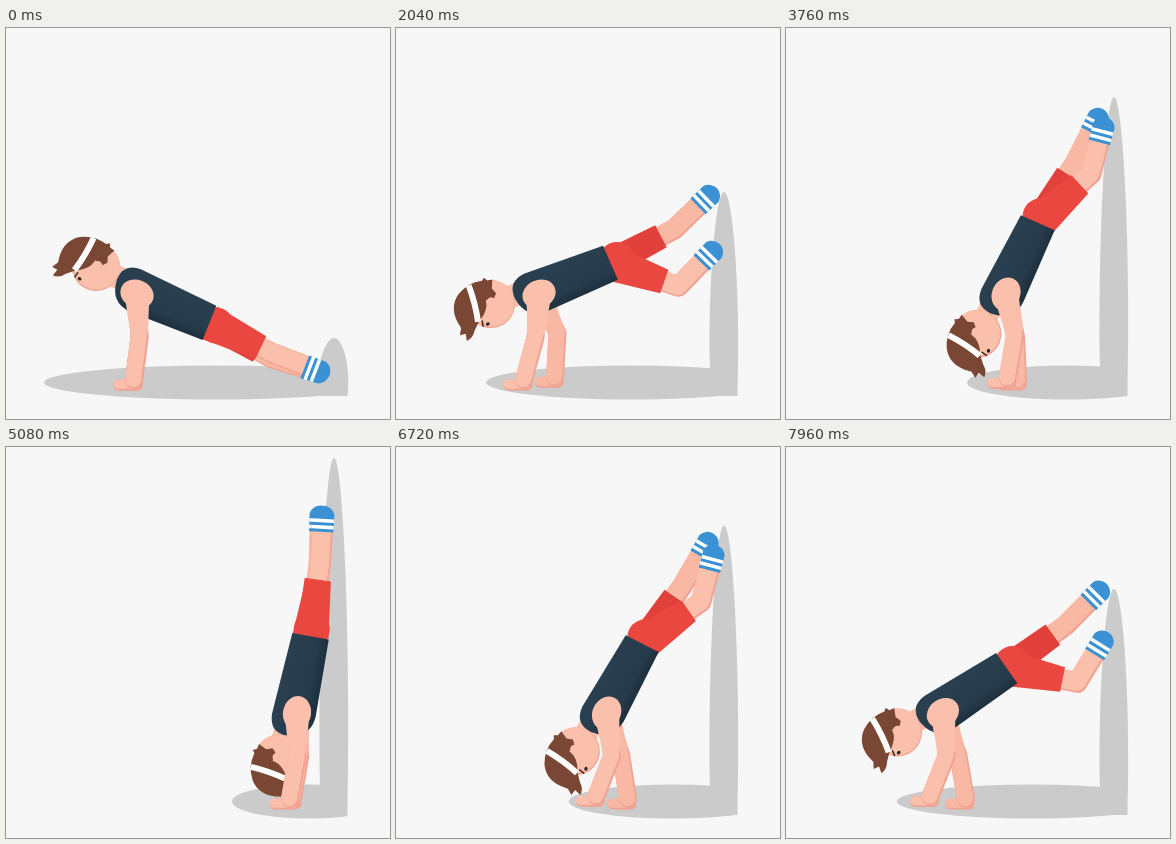
An HTML page with a canvas for the animation above (8000 ms loop, 384x391 px).

```html
<!DOCTYPE html>
<html lang="en">
<head>
<meta charset="utf-8">
<title>Wall walk</title>
<style>
html, body { margin: 0; width: 100%; height: 100%; overflow: hidden; background: #f7f7f7; }
canvas { display: block; width: 384px; height: 391px; }
</style>
</head>
<body>
<canvas id="stage" width="384" height="391"></canvas>
<script>
const ctx = document.getElementById('stage').getContext('2d');
const LOOP = 8000, PEAK = 5080, DESCENT = 0.92;
const SKIN = '#fbc0ab', SKIN_EDGE = '#f0a392', SKIN_FAR = '#f8b8a4';
const RED = '#e9473f', RED_FAR = '#e2413b', BLUE = '#3a91d3', HAIR = '#7a4735', SHADE = '#cbcbcb';
const SHOULDER_Y = 266, WRIST_Y = 352, FOOT_X = 317;
const TORSO = 78, THIGH = 72, SHIN = 51, STRIDE = 52;

// Key poses of the climb; the way down plays them in reverse.
const poses = [
  { at: 0, x: 131, tilt: 21.7, near: 345, far: 345, left: 38, top: 310 },
  { at: 1320, x: 126, tilt: 4, near: 270, far: 231, left: 56, top: 204 },
  { at: 2040, x: 143, tilt: -23.6, near: 222, far: 166, left: 90, top: 164 },
  { at: 3760, x: 220, tilt: -66, near: 97, far: 85, left: 181, top: 69 },
  { at: PEAK, x: 291, tilt: -80, near: 62, far: 62, left: 226, top: 11 }
];

const ease = u => u * u * (3 - 2 * u);
const clamp = u => Math.max(0, Math.min(1, u));

// Smooth interpolation without overshoot, coming to rest at the peak.
function poseAt(time) {
  const t = time < PEAK ? time : PEAK - (time - PEAK) * DESCENT;
  let i = 0;
  while (i < poses.length - 2 && t >= poses[i + 1].at) i++;
  const a = poses[i], b = poses[i + 1], span = b.at - a.at;
  const u = (t - a.at) / span, w = 1 - u;
  const rate = (k, key) => (poses[k + 1][key] - poses[k][key]) / (poses[k + 1].at - poses[k].at);
  const slope = (k, key) => {
    if (k === 0) return rate(0, key);
    if (k === poses.length - 1) return 0;
    const p = rate(k - 1, key), q = rate(k, key);
    return p * q <= 0 ? 0 : 2 * p * q / (p + q);
  };
  const pose = {};
  for (const key in a) {
    pose[key] = a[key] + (b[key] - a[key]) * ease(u)
      + span * (slope(i, key) * u * w * w - slope(i + 1, key) * u * u * w);
  }
  return pose;
}

// A hand stays planted, then swings one stride while the shoulder passes over it.
function handAt(x, from, to) {
  const steps = (x - 128) / STRIDE, planted = Math.max(0, Math.floor(steps));
  const swing = ease(clamp((steps - planted - from) / (to - from)));
  const lift = Math.sin(Math.PI * swing);
  return { wrist: [128 + (planted + swing) * STRIDE, WRIST_Y - 3 * lift], bend: 4 + 7 * lift };
}

const along = ([x, y], angle, d) => [x + d * Math.cos(angle), y + d * Math.sin(angle)];
const angleOf = (a, b) => Math.atan2(b[1] - a[1], b[0] - a[0]);

function bendPoint(a, b, share, bend) {
  const middle = [a[0] + (b[0] - a[0]) * share, a[1] + (b[1] - a[1]) * share];
  return along(middle, angleOf(a, b) + Math.PI / 2, bend);
}

function oval([x, y], rx, ry, color) {
  ctx.fillStyle = color;
  ctx.beginPath();
  ctx.ellipse(x, y, rx, ry, 0, 0, 2 * Math.PI);
  ctx.fill();
}

function line(points, width, color) {
  ctx.strokeStyle = color;
  ctx.lineWidth = width;
  ctx.lineCap = ctx.lineJoin = 'round';
  ctx.beginPath();
  points.forEach(p => ctx.lineTo(...p));
  ctx.stroke();
}

function limb(points, width, color) {
  line(points, width, SKIN_EDGE);
  line(points.map(([x, y]) => [x - 0.8, y - 0.8]), width - 2, color);
}

function placed([x, y], angle, draw) {
  ctx.save();
  ctx.translate(x, y);
  ctx.rotate(angle);
  draw();
  ctx.restore();
}

function shape(d, color) {
  ctx.fillStyle = color;
  ctx.fill(new Path2D(d));
}

function taper(a, angle, length, w0, w1, color) {
  placed(a, angle, () => shape(`M0 ${-w0 / 2}L${length} ${-w1 / 2}V${w1 / 2}L0 ${w0 / 2}Z`, color));
}

function drawShade(left, top) {
  const middle = (368 + top) / 2, right = 380;
  ctx.save();
  ctx.beginPath();
  ctx.rect(0, 0, 341, 391);
  ctx.clip();
  oval([(left + right) / 2, 354.5], (right - left) / 2, 17, SHADE);
  ctx.restore();
  shape(`M314 368V${Math.max(338, top + 20)}C312 ${middle} 319 ${top} 328 ${top}` +
    `C337 ${top} 345 ${middle} 341.5 368Z`, SHADE);
}

function drawArm(shoulder, tilt, { wrist, bend }, color) {
  const elbow = bendPoint(shoulder, wrist, 0.5, -bend);
  const [x, y] = wrist;
  limb([[x - 15, y + 5], [x + 3, y + 5]], 11, color);
  limb([shoulder, elbow, wrist], 18, color);
  taper(shoulder, angleOf(shoulder, elbow), 40, 25, 17, color);
  placed(shoulder, tilt, () => oval([0, 0], 17, 14, color));
}

function drawLeg(hip, target, skin, red, waist) {
  const dir = angleOf(hip, target);
  const dist = Math.min(THIGH + SHIN - 0.1, Math.hypot(target[0] - hip[0], target[1] - hip[1]));
  const foot = along(hip, dir, dist);
  const reach = (dist * dist + THIGH * THIGH - SHIN * SHIN) / (2 * dist);
  const knee = bendPoint(hip, foot, reach / dist, Math.sqrt(Math.max(0, THIGH * THIGH - reach * reach)));
  const thighAngle = angleOf(hip, knee), shinAngle = angleOf(knee, foot);
  limb([along(hip, thighAngle, 45), knee, along(foot, shinAngle, -14)], 20.5, skin);
  placed(foot, shinAngle, () => {
    shape('M-18-11H0A11.5 11.5 0 0 1 0 11H-18Z', BLUE);
    shape('M-15-11h3.5v22h-3.5zM-8.5-11h3.5v22h-3.5z', '#fff');
  });
  taper(hip, thighAngle, 57, waist, 25, red);
}

function drawHead() {
  line([[10, 1], [39, 3]], 23, SKIN);
  oval([5, 1], 24, 24, SKIN_EDGE);
  oval([5.3, 0.3], 23.3, 23.3, SKIN);
  shape('M11-22L9-26L6-24Q-8-28-21-21Q-34-13-33 4L-32 11L-36 17L-30 18L-32 25Q-25 25-21 19' +
    'L-13 12Q-4 8 0 1L2-5Q8 0 12-5L14-7L12-13L16-21Z', HAIR);
  oval([6, -1], 4.5, 4.5, SKIN);
  ctx.strokeStyle = '#fff';
  ctx.lineWidth = 6;
  ctx.lineCap = 'butt';
  ctx.stroke(new Path2D('M-8-25Q-9-6-14 12'));
  line([[-11, 18], [-10, 13]], 1.6, '#4a2b24');
  oval([-6, 18], 2, 1.6, '#2b2526');
}

function drawTorso() {
  const tone = ctx.createLinearGradient(0, -25, 0, 20);
  tone.addColorStop(0, '#2a4050');
  tone.addColorStop(0.75, '#263b4b');
  tone.addColorStop(1, '#1b2e3b');
  shape(`M${TORSO}-18.5L-5-24.5Q-24-24-24-6Q-22 18 0 19L${TORSO} 18.5Z`, tone);
}

function draw(t) {
  const pose = poseAt(t);
  const shoulder = [pose.x, SHOULDER_Y], tilt = pose.tilt * Math.PI / 180;
  const hip = along(shoulder, tilt, TORSO);

  ctx.fillStyle = '#f7f7f7';
  ctx.fillRect(0, 0, 384, 391);
  drawShade(pose.left, pose.top);
  drawArm(shoulder, tilt, handAt(pose.x, 0.08, 0.45), SKIN_FAR);
  drawLeg(hip, [FOOT_X - 2, pose.far], SKIN_FAR, RED_FAR, 28);
  oval(along(hip, tilt, 7), 18, 18, RED);
  drawLeg(hip, [FOOT_X + 1, pose.near], SKIN, RED, 36);
  placed(shoulder, tilt, () => {
    placed([-53, -11], 0, drawHead);
    drawTorso();
  });
  drawArm(shoulder, tilt, handAt(pose.x, 0.32, 0.95), SKIN);
}

const start = performance.now();
function tick() {
  draw((performance.now() - start) % LOOP);
  requestAnimationFrame(tick);
}
tick();
</script>
</body>
</html>
```
